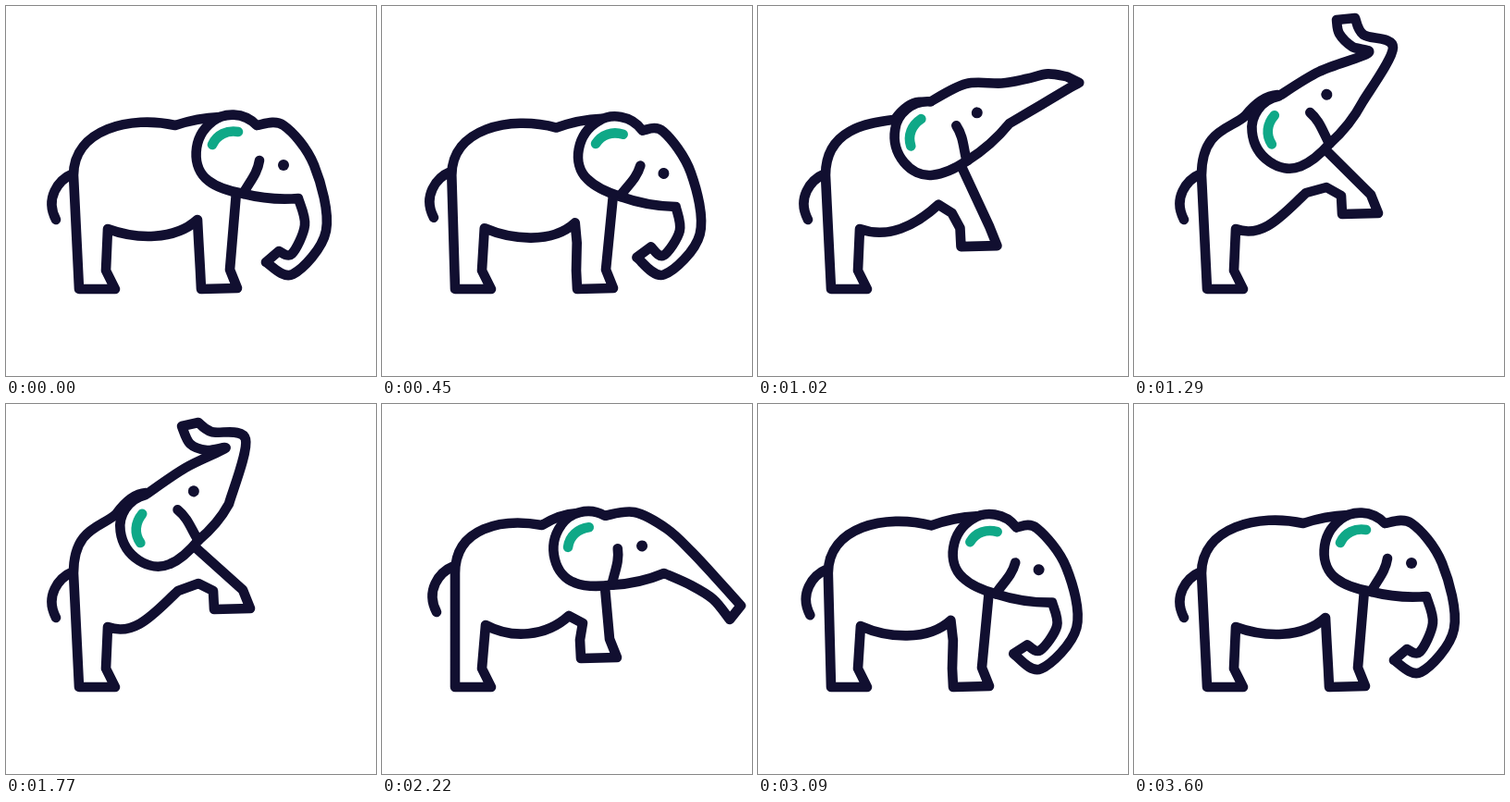
Write an HTML page that moves like this. It is 400 by 400 pixels and loops after 5.63 s.

```html
<!DOCTYPE html>
<html lang="en">
<head>
<meta charset="utf-8">
<title>Elephant</title>
<style>
  html, body { margin: 0; height: 100%; overflow: hidden; background: #fff; }
  svg { display: block; width: 100vw; height: 100vh; }
  path { fill: none; stroke: #110f30; stroke-width: 10.6; stroke-linecap: round; stroke-linejoin: round; }
  .skin { fill: #fff; }
</style>
</head>
<body>
<svg viewBox="0 0 400 400">
  <path id="body"/>
  <g id="head">
    <path id="trunk" class="skin"/>
    <path class="skin" d="M26-31C12-46-10-45-22-35C-44-18-45 15-26 29C-17 36-6 40 12 43"/>
    <path d="M29 7C27 20 20 28 13 40"/>
    <path d="M-22-10C-17-21-6-26 6-24" style="stroke:#0fa887"/>
    <circle cx="55" cy="12" r="6" fill="#110f30"/>
  </g>
</svg>
<script>
const LOOP = 5630, END = 3600, STEP = 30;
const $ = id => document.getElementById(id);
const mix = (a, b, k) => a.map((v, i) => v + (b[i] - v) * k);

// Moves stage points into the turned frame of the head
function toHead(points, [angle, cx, cy]) {
  const c = Math.cos(angle * Math.PI / 180), s = Math.sin(angle * Math.PI / 180);
  return points.map(([px, py]) => {
    const x = px - cx, y = py - cy;
    return [x * c + y * s, y * c - x * s];
  });
}

// head: angle, centre; body: lean, back dent, belly corner, knee, foot;
// trunk: brow, three points outside, two at the tip, two inside, mouth
const HEAD = 3, BODY = 9;
const pose = (head, body, ...trunk) => [...head, ...body, ...toHead(trunk, head).flat()];

const stand = pose([0, 245, 160], [0, 183, 129, 207, 231, 208, 250, 211, 306],
  [300, 129], [333, 172], [346, 243], [310, 290], [281, 277], [295, 265], [309, 268], [323, 237], [316, 208]);
const crouch = pose([13, 256, 163], [1, 193, 134, 210, 237, 215, 262, 211, 306],
  [303, 139], [334, 181], [346, 240], [308, 283], [276, 262], [291, 255], [305, 264], [324, 243], [320, 222]);
const reach = pose([-27, 218, 154], [0, 169, 126, 202, 224, 210, 244, 215, 287],
  [258, 105], [305, 122], [342, 151], [364, 177], [385, 206], [371, 218], [354, 196], [330, 179], [303, 165]);
const lift = pose([-50, 176, 139], [0, 135, 121, 191, 209, 209, 210, 222, 244],
  [210, 75], [244, 66], [263, 53], [274, 34], [280, 20], [301, 22], [304, 40], [291, 73], [256, 110]);
const rear = pose([-58, 169, 136], [0, 120, 119, 186, 202, 208, 196, 225, 225],
  [200, 71], [253, 51], [236, 44], [222, 30], [219, 15], [239, 13], [248, 31], [280, 45], [247, 104]);
const curl = pose([-60, 165, 136], [0, 119, 119, 186, 202, 208, 194, 225, 222],
  [194, 69], [237, 48], [217, 50], [199, 43], [190, 24], [208, 20], [222, 30], [259, 38], [241, 108]);
const land = pose([-17, 225, 158], [1, 173, 131, 202, 229, 217, 237, 215, 275],
  [273, 117], [308, 135], [335, 160], [361, 188], [388, 218], [376, 233], [358, 211], [334, 196], [305, 183]);
const hang = pose([4, 249, 161], [1, 185, 133, 207, 234, 216, 252, 212, 294],
  [298, 131], [333, 172], [354, 228], [357, 290], [352, 322], [334, 328], [331, 300], [326, 255], [315, 214]);
const drop = [...mix(curl, land, .5).slice(0, HEAD + BODY), ...lift.slice(HEAD + BODY)];

const keys = [
  [0, stand], [300, crouch], [560, stand], [780, reach], [1150, lift], [1290, rear],
  [1770, curl], [2000, drop], [2220, land], [2410, hang], [2700, crouch],
  [3420, mix(crouch, stand, .98)], [END, stand]
];

// Slope of component i at key k: flat at turning points
function slope(k, i) {
  if (!k || k === keys.length - 1) return 0;
  const rate = j => (keys[j + 1][1][i] - keys[j][1][i]) / (keys[j + 1][0] - keys[j][0]);
  const a = rate(k - 1), b = rate(k);
  return a * b > 0 ? 2 * a * b / (a + b) : 0;
}

function poseAt(t) {
  if (t >= END) return stand;
  const k = keys.findIndex(key => key[0] > t) - 1;
  const [t0, a] = keys[k], [t1, b] = keys[k + 1];
  const d = t1 - t0, u = (t - t0) / d, v = 1 - u;
  return a.map((p, i) =>
    v * v * (1 + 2 * u) * p + u * u * (3 - 2 * u) * b[i] +
    d * u * v * (v * slope(k, i) - u * slope(k + 1, i)));
}

// Smooth curve through points, continuing from the first
function curve(pts) {
  const at = i => pts[Math.max(0, Math.min(i, pts.length - 1))];
  return pts.slice(1).map((q, i) => {
    const p = at(i), before = at(i - 1), after = at(i + 2);
    const c1 = p.map((v, n) => v + (q[n] - before[n]) / 6);
    const c2 = q.map((v, n) => v - (after[n] - p[n]) / 6);
    return `C${[c1, c2, q].join(' ')}`;
  }).join('');
}

function bodyPath([angle, cx, cy, lean, dx, dy, bx, by, kx, ky, fx, fy]) {
  const a = angle * Math.PI / 180, c = Math.cos(a), s = Math.sin(a);
  const hip = 73 + 6 * lean, tx = 5 * lean, ty = -6 * lean;
  const nx = cx - 14, ny = cy - 40;
  const shoulder = [cx + 4 * c - 41 * s, cy + 4 * s + 41 * c];
  return `M${73 + tx} ${181 + ty}c-17 7-31 27-19 50` +
    `M${nx} ${ny}Q${(nx + dx) / 2} ${ny + 1} ${dx} ${dy}` +
    `C${47 + dx * .48} ${118 + (183 - dx) * .24 + 3 * lean} ${hip} 133 ${hip} 183` +
    `L79 306H118L108 286L${110 + 2 * lean} ${241 - 2 * lean}` +
    `C140 ${252 + 2 * lean} ${bx - 25} ${by + 23} ${bx} ${by}` +
    `L${kx} ${ky}L${fx - 1} ${fy - 20}L${fx} ${fy}l39-1l-8-20L${shoulder}`;
}

function trunkPath(flat) {
  const pts = [];
  for (let i = 0; i < flat.length; i += 2) pts.push(flat.slice(i, i + 2));
  const notch = [26, -31], jaw = [12, 43], mouth = pts[8];
  return `M${notch}${curve([notch, ...pts.slice(0, 5)])}L${pts[5]}${curve(pts.slice(5))}` +
    `Q${(mouth[0] + jaw[0]) / 2} ${(mouth[1] + jaw[1]) / 2 + 5} ${jaw}`;
}

function draw(t) {
  const p = poseAt(Math.floor(t / STEP) * STEP);
  $('body').setAttribute('d', bodyPath(p));
  $('trunk').setAttribute('d', trunkPath(p.slice(HEAD + BODY)));
  $('head').setAttribute('transform', `translate(${p[1]} ${p[2]}) rotate(${p[0]})`);
}

const start = performance.now();
function tick() {
  draw((performance.now() - start) % LOOP);
  requestAnimationFrame(tick);
}
tick();
</script>
</body>
</html>
```
